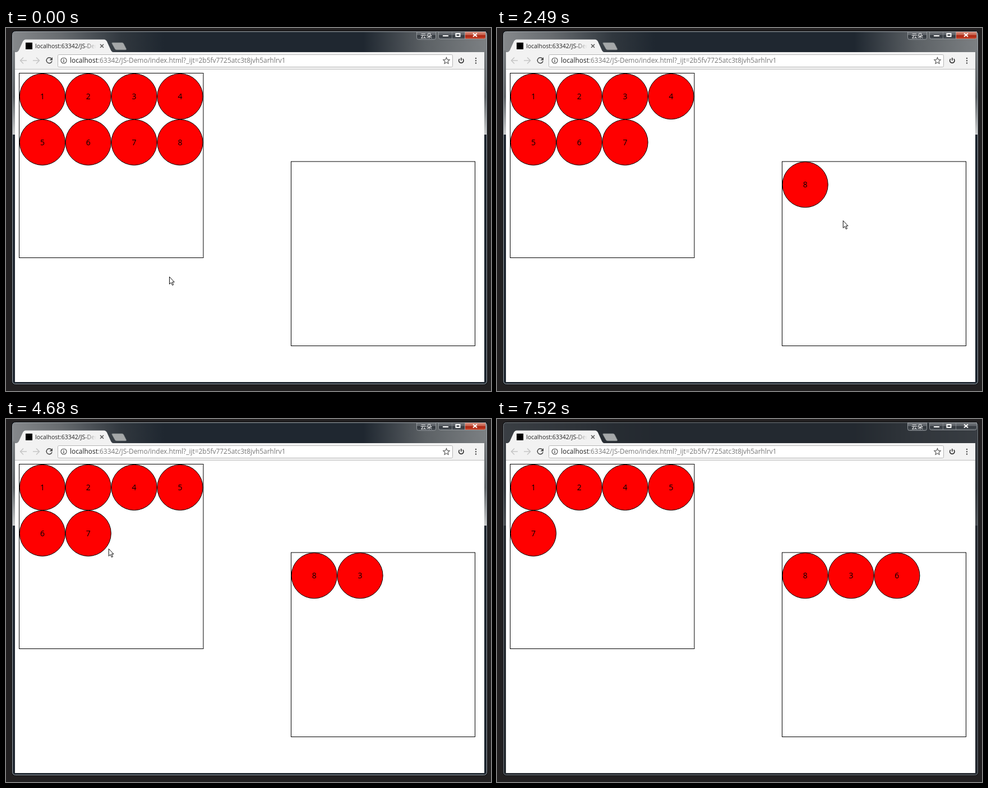
These frames come from a looping animation (865x647 px, 7560 ms). An HTML page:

```html
<!DOCTYPE html>
<html lang="en">
<head>
<meta charset="utf-8">
<title>Drag and drop demo</title>
<style>
  html, body { margin: 0; width: 100%; height: 100%; overflow: hidden; background: #222021; }
  svg { display: block; width: 865px; height: 647px; }
  text { font-family: "Open Sans", "Noto Sans", sans-serif; }
  .ball circle { fill: red; stroke: #000; }
  .ball text { font-size: 14px; text-anchor: middle; }
  .badge { font: 10.5px "Noto Sans CJK SC", "Noto Sans CJK", sans-serif; text-anchor: middle; }
  .line { fill: none; stroke-width: 1.5; }
  .thick { stroke-width: 2; }
  .idle .glow { opacity: .22; }
  .idle .red { display: none; }
  .idle .base { fill: #252a30; }
  .idle .rim { stroke: #777c80; }
</style>
</head>
<body>
<svg id="stage" viewBox="0 0 865 647">
  <defs>
    <linearGradient id="topGlass">
      <stop offset="0" stop-color="#85888b"/>
      <stop offset=".1" stop-color="#686c70"/>
      <stop offset=".23" stop-color="#30373e"/>
      <stop offset=".32" stop-color="#1f2730"/>
      <stop offset=".74" stop-color="#1f2730"/>
      <stop offset=".87" stop-color="#5c6165"/>
      <stop offset="1" stop-color="#7c8083"/>
    </linearGradient>
    <linearGradient id="sideGlass" x2="0" y2="1">
      <stop offset="0" stop-color="#777b7e"/>
      <stop offset=".55" stop-color="#5d6266"/>
      <stop offset="1" stop-color="#c9cbcc"/>
    </linearGradient>
    <linearGradient id="button" x2="0" y2="1">
      <stop offset="0" stop-color="#777b80"/>
      <stop offset=".48" stop-color="#555a60"/>
      <stop offset=".5" stop-color="#30353b"/>
      <stop offset="1" stop-color="#4d5359"/>
    </linearGradient>
    <linearGradient id="close" x2="0" y2="1">
      <stop offset="0" stop-color="#dc9b8c"/>
      <stop offset=".48" stop-color="#c4543f"/>
      <stop offset=".5" stop-color="#a5200d"/>
      <stop offset="1" stop-color="#cc4a30"/>
    </linearGradient>
    <linearGradient id="fade">
      <stop offset=".8" stop-color="#f2f2f2" stop-opacity="0"/>
      <stop offset="1" stop-color="#f2f2f2"/>
    </linearGradient>
  </defs>

  <!-- window frame -->
  <rect x="10" y="5" width="849" height="631" rx="6" fill="#0c0e11"/>
  <rect class="base" x="11" y="6" width="847" height="629" rx="5" fill="#1f2730"/>
  <g class="glow">
    <rect x="12" y="7" width="845" height="37" rx="4" fill="url(#topGlass)"/>
    <path d="M12 40h4v150h-4zM853 40h4v150h-4z" fill="url(#sideGlass)"/>
  </g>
  <rect class="rim" x="11.5" y="6.5" width="846" height="628" rx="5" fill="none" stroke="#a5abb0"/>
  <rect x="16" y="43" width="837" height="588" fill="#fff"/>

  <!-- window buttons -->
  <g stroke="#9ba0a4" stroke-width=".9">
    <path d="M732.5 6.500h34v11q0 3-3 3h-28q-3 0-3-3z" fill="url(#button)"/>
    <path d="M771.5 6.500h84v10q0 3-3 3h-78q-3 0-3-3z" fill="url(#button)"/>
    <path class="red" d="M818.5 6.500h37v10q0 3-3 3h-34z" fill="url(#close)"/>
    <path d="M795.5 7v12M818.5 7v12" opacity=".7"/>
  </g>
  <text class="badge" x="749.5" y="17.5" fill="#fff">云朵</text>
  <g class="line thick" stroke="#fff">
    <path d="M779 14h10M833 9.500l7 6m0-6l-7 6"/>
    <rect x="802.5" y="10" width="7" height="5"/>
  </g>

  <!-- tab strip -->
  <path d="M16 43.5q5 0 7-4l7-15.500q2-3.500 5-3.500h140q3 0 5 3.500l7 15.500q2 4 6 4z" fill="#f2f2f2"/>
  <path d="M190 26h17q2 0 3 2l4.500 9q.8 2-1.500 2h-16q-2 0-3-2l-5-9q-1-2 1-2z" fill="#a5a8a9" stroke="#646a6e" stroke-width=".7"/>
  <rect x="35" y="26" width="12" height="12" fill="#000"/>
  <text x="52" y="35.5" font-size="10.5" fill="#222">localhost:63342/JS-Der</text>
  <rect x="52" y="24" width="109" height="16" fill="url(#fade)"/>
  <rect x="161" y="24" width="6" height="16" fill="#f2f2f2"/>
  <path class="line" d="M168 29l6 6m0-6l-6 6" stroke="#555"/>

  <!-- toolbar -->
  <rect x="16" y="43" width="837" height="30" fill="#f2f2f2"/>
  <path d="M16 73.5h837" stroke="#bcbcbc"/>
  <rect x="92.5" y="47.5" width="704" height="22" rx="2" fill="#fff" stroke="#b5b5b5"/>
  <g class="line">
    <path stroke="#c6c6c6" d="M37 58H26m5-5.500l-5.500 5.500 5.500 5.500M48 58h11m-5-5.500l5.500 5.500-5.500 5.500"/>
    <path stroke="#4a4a4a" d="M81 54.500a5 5 0 1 0 1 4.500"/>
    <path stroke="#222" d="M809 55a4.200 4.200 0 1 0 5.600 0M811.800 53v5"/>
    <path stroke="#555" stroke-width="1.1" d="M785.5 52.500l1.600 3.800 4.100.4-3.100 2.700.9 4-3.500-2.100-3.500 2.100.9-4-3.100-2.700 4.100-.4z"/>
    <circle stroke="#555" stroke-width="1.2" cx="103" cy="58" r="5"/>
    <path stroke="#555" d="M103 57.200v3.800M103 54.800v1.400"/>
    <path stroke="#555" stroke-width="2.6" stroke-linecap="round" stroke-dasharray="0 4.300" d="M838 54v9"/>
  </g>
  <path d="M83 52v5.500h-5.500z" fill="#4a4a4a"/>
  <text x="114" y="62" font-size="11.92" fill="#777"><tspan fill="#222">localhost</tspan>:63342/JS-Demo/index.html?_ijt=2b5fv7725atc3t8jvh5arhlrv1</text>

  <!-- page -->
  <g fill="none" stroke="#000">
    <rect x="23.5" y="80.5" width="328.4" height="329"/>
    <rect x="508.5" y="238" width="328" height="328.5"/>
  </g>
  <g id="balls"></g>
  <g id="cursor">
    <g id="ban" fill="none">
      <circle r="7" stroke="#fff" stroke-width="4"/>
      <circle r="6.6" stroke="#000" stroke-width="2" fill="#fff"/>
      <path d="M-4.500-4.500l9 9" stroke="#000" stroke-width="2.2"/>
      <circle r="8.2" stroke="#555" stroke-width=".6"/>
    </g>
    <g id="drop" stroke="#000" stroke-width=".9">
      <circle r="8.3" fill="none" stroke="#fff" stroke-width="2"/>
      <circle r="8.5" fill="none"/>
      <rect x="1.5" y="11.5" width="9" height="6.5" rx="1" fill="#fff"/>
    </g>
    <path id="arrow" d="M.5.5v13l3-2.800 2.200 4.800 2-.9-2.100-4.700H9.300z" fill="#fff" stroke="#000" stroke-width=".95"/>
  </g>
</svg>
<script>
const LOOP = 7560, BLUR_AT = 7520, CURSOR_GONE = 6680;
const PITCH = 81.83, GHOST_LAG = 31;
const $ = id => document.getElementById(id);

// Each move eases the pointer to x, y; sag bows its path downwards.
const moves = [
  { start: 990, end: 1110, x: 283, y: 436 },
  { start: 1300, end: 1650, x: 318, y: 222 },
  { start: 1865, end: 2085, x: 617, y: 343, sag: 26 },
  { start: 2480, end: 3300, x: 251, y: 143 },
  { start: 3380, end: 3780, x: 683, y: 335 },
  { start: 4360, end: 4800, x: 73, y: 208 },
  { start: 4923, end: 5105, x: 785, y: 380, sag: 48 },
  { start: 5150, end: 5420, x: 767, y: 342 },
  { start: 5640, end: 5710, x: 766, y: 325 },
  { start: 5830, end: 6400, x: 781, y: 364 },
  { start: 6420, end: 6690, x: 805, y: 630 }
];
const drags = [
  { label: 8, grab: 1865, drop: 2460 },
  { label: 3, grab: 3380, drop: 4130 },
  { label: 6, grab: 4923, drop: 5660 }
];
const labels = [1, 2, 3, 4, 5, 6, 7, 8];

function pointerAt(t) {
  let x = 291, y = 443;
  for (const move of moves) {
    const k = Math.min(1, Math.max(0, (t - move.start) / (move.end - move.start)));
    const eased = k * k * (3 - 2 * k);
    x += (move.x - x) * eased;
    y += (move.y - y) * eased + (move.sag || 0) * Math.sin(Math.PI * eased);
  }
  return [x, y];
}

function slot(index, x, y) {
  return [x + index % 4 * PITCH, y + Math.floor(index / 4) * PITCH];
}

// Ball centres by label, for a given time.
function layoutAt(t) {
  const moved = drags.filter(drag => t >= drag.drop).map(drag => drag.label);
  const kept = labels.filter(label => !moved.includes(label));
  return labels.map(label => moved.includes(label)
    ? slot(moved.indexOf(label), 549.7, 279.2)
    : slot(kept.indexOf(label), 64.9, 122));
}

function makeBall(label) {
  const ball = document.createElementNS('http://www.w3.org/2000/svg', 'g');
  ball.setAttribute('class', 'ball');
  ball.innerHTML = `<circle r="40.6"/><text y="5">${label}</text>`;
  $('balls').append(ball);
  return ball;
}

const place = (node, [x, y]) => node.setAttribute('transform', `translate(${x} ${y})`);
const show = (node, visible) => node.style.display = visible ? '' : 'none';

const balls = labels.map(makeBall);
const ghost = makeBall('');
ghost.style.opacity = .75;

function draw(t) {
  const centres = layoutAt(t);
  centres.forEach((centre, i) => place(balls[i], centre));

  const drag = drags.find(({ grab, drop }) => t > grab + GHOST_LAG && t < drop);
  show(ghost, drag);
  if (drag) {
    const home = centres[drag.label - 1];
    const grip = pointerAt(drag.grab), now = pointerAt(t - GHOST_LAG);
    place(ghost, home.map((value, axis) => value + now[axis] - grip[axis]));
    ghost.lastChild.textContent = drag.label;
  }

  const [x, y] = pointerAt(t);
  const overTarget = x > 508 && y > 238;
  place($('cursor'), [x, y]);
  show($('cursor'), t < CURSOR_GONE);
  show($('ban'), drag && !overTarget);
  show($('drop'), drag && overTarget);
  show($('arrow'), !drag || overTarget);
  $('stage').classList.toggle('idle', t >= BLUR_AT);
}

const start = performance.now();
function tick() {
  draw((performance.now() - start) % LOOP);
  requestAnimationFrame(tick);
}
tick();
</script>
</body>
</html>
```
